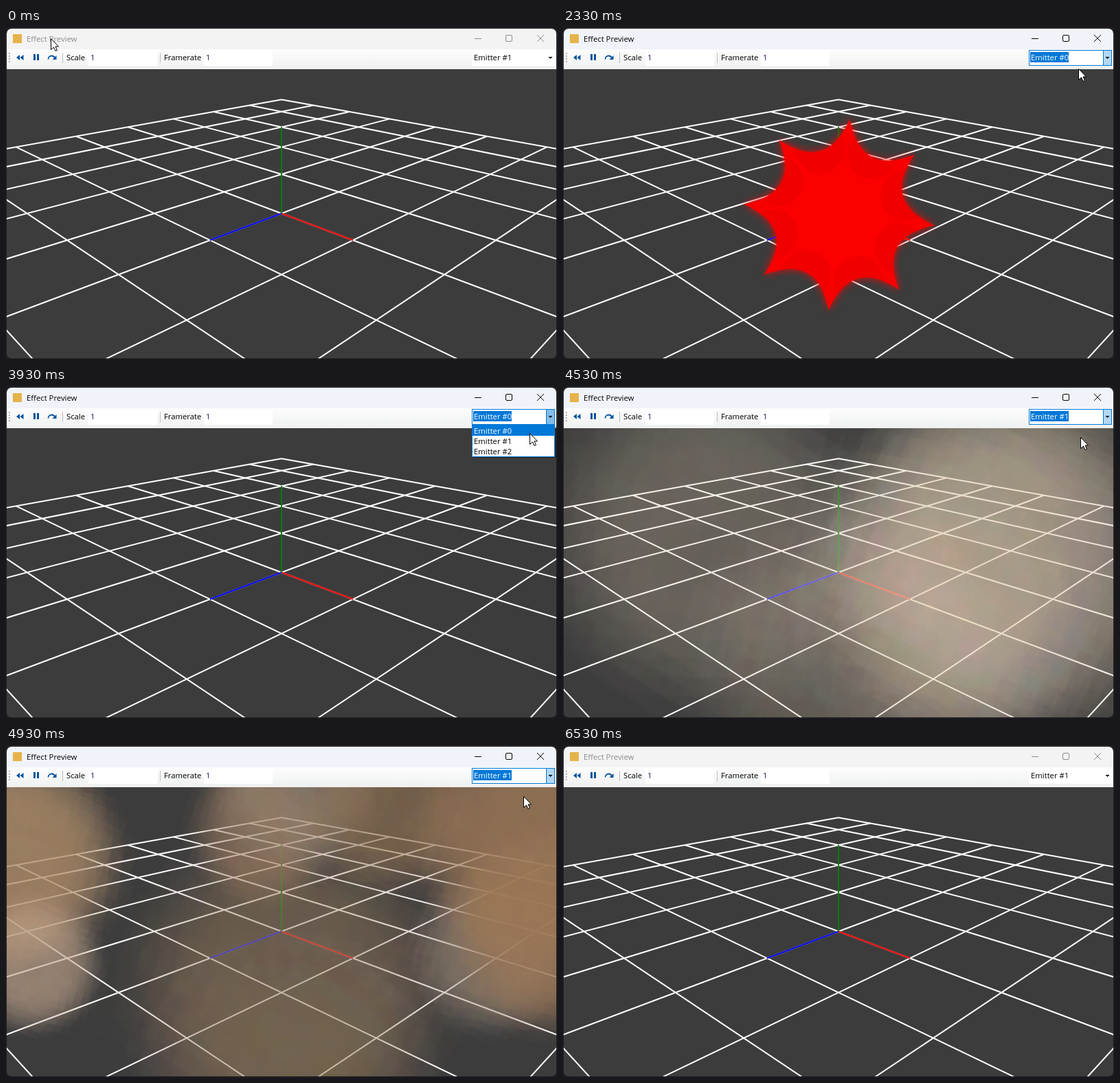
An HTML page with a canvas for the animation above (6.59 s loop, 802 px wide and 482 px high).

```html
<!DOCTYPE html>
<html lang="en">
<head>
<meta charset="utf-8">
<title>Effect Preview</title>
<style>
html, body { margin: 0; width: 100%; height: 100%; overflow: hidden; background: #1e1e1e; }
canvas { display: block; }
</style>
</head>
<body>
<canvas id="stage" width="802" height="482"></canvas>
<script>
const ctx = document.getElementById('stage').getContext('2d');
const LOOP = 6590, STEP = 1000 / 15;
const BLUE = '#0078d7';

function rect(x, y, w, h, color) {
  ctx.fillStyle = color;
  ctx.fillRect(x, y, w, h);
}

function text(str, x, y, color = '#000') {
  ctx.font = '11.3px "Open Sans", "Noto Sans", sans-serif';
  ctx.fillStyle = color;
  ctx.fillText(str, x, y);
}

function poly(points, fill, stroke, width = 1) {
  ctx.beginPath();
  points.forEach(([x, y]) => ctx.lineTo(x, y));
  if (fill) {
    ctx.closePath();
    ctx.fillStyle = fill;
    ctx.fill();
  }
  if (stroke) {
    ctx.strokeStyle = stroke;
    ctx.lineWidth = width;
    ctx.stroke();
  }
}

function seeded(seed) {
  return () => (seed = seed * 16807 % 2147483647) / 2147483647;
}

// Floor plane seen in perspective along its diagonal
function project(x, z) {
  const s = (x + z) / 2, w = 1 - 0.2192 * s;
  return [401 + 92.6 * (x - z) / w, (270 + 10.3 * s) / w];
}

function drawGrid() {
  for (let i = -5; i <= 5; i++) {
    const end = Math.min(5, 8.8 - i);
    poly([project(-5, i), project(end, i)], null, '#fff', 2);
    poly([project(i, -5), project(i, end)], null, '#fff', 2);
  }
  const origin = project(0, 0);
  poly([origin, project(1, 0)], null, '#f00000', 2);
  poly([origin, project(0, 1)], null, '#0000f0', 2);
  poly([origin, [401, 144]], null, '#008000', 2);
}

function drawStar(radius, alpha) {
  const at = (turn, r) => [Math.cos(turn * Math.PI / 4 - 1.46) * r, Math.sin(turn * Math.PI / 4 - 1.46) * r];
  ctx.save();
  ctx.translate(402, 272);
  ctx.globalAlpha = alpha;
  ctx.beginPath();
  ctx.moveTo(...at(0, radius));
  for (let i = 0; i < 8; i++) ctx.quadraticCurveTo(...at(i + 0.5, radius * 0.456), ...at(i + 1, radius));
  ctx.fillStyle = '#fa0000';
  ctx.shadowColor = '#f00';
  ctx.shadowBlur = 12;
  ctx.fill();
  ctx.shadowBlur = 0;
  ctx.clip();
  for (let i = 0; i < 8; i++) {
    ctx.beginPath();
    ctx.arc(...at(i + 0.5, radius * 0.72), radius * 0.26, 0, 7);
    ctx.fillStyle = 'rgba(225,0,0,.4)';
    ctx.fill();
  }
  ctx.restore();
}

// Coarse soft sprite, enlarged without smoothing
function makeSprite(rgb) {
  const size = 18, rand = seeded(77), sprite = document.createElement('canvas');
  sprite.width = sprite.height = size;
  const pen = sprite.getContext('2d');
  for (let y = 0; y < size; y++) for (let x = 0; x < size; x++) {
    const r = Math.hypot(x - 8.5, y - 8.5) / 9;
    const edge = Math.max(0, Math.min(1, (1 - r) / 0.45));
    pen.fillStyle = `rgba(${rgb},${edge * (0.88 + 0.12 * rand())})`;
    pen.fillRect(x, y, 1, 1);
  }
  return sprite;
}

const puff = (x, y, size, alpha, rgb) => ({ x, y, size, alpha, sprite: makeSprite(rgb) });
const PALE = '226,204,175', BROWN = '155,118,85';
const haze = [
  puff(630, 240, 560, 0.52, PALE),
  puff(600, 220, 420, 0.2, PALE),
  puff(210, 220, 500, 0.26, PALE),
  puff(440, 430, 520, 0.22, PALE),
  puff(560, 330, 420, 0.15, PALE)
];
const clouds = [
  puff(400, 340, 480, 0.5, '150,120,90'),
  puff(410, 480, 420, 0.15, '150,120,90'),
  puff(420, 60, 260, 0.55, '160,150,135'),
  puff(370, 130, 210, 0.55, '165,128,98'),
  puff(560, 90, 260, 0.65, '145,112,80'),
  puff(30, 160, 320, 0.82, '175,140,105'),
  puff(60, 310, 200, 0.65, '195,165,140'),
  puff(690, 300, 240, 0.55, '165,145,125'),
  puff(760, 150, 370, 0.85, BROWN),
  puff(770, 270, 300, 0.8, BROWN)
];

function drawPuffs(puffs, spread, fade) {
  const copies = 7, rand = seeded(4242);
  ctx.imageSmoothingEnabled = false;
  for (const p of puffs) {
    const alpha = 1 - (1 - p.alpha * fade) ** (1 / copies);
    for (let i = 0; i < copies; i++) {
      ctx.save();
      ctx.globalAlpha = alpha;
      ctx.translate(
        400 + (p.x - 400) * spread + (rand() - 0.5) * p.size * 0.12,
        230 + (p.y - 230) * spread + (rand() - 0.5) * p.size * 0.12
      );
      ctx.rotate((rand() - 0.5) * 0.8 + spread * 0.3);
      ctx.drawImage(p.sprite, -p.size / 2, -p.size / 2, p.size, p.size);
      ctx.restore();
    }
  }
}

const clamp = v => Math.max(0, Math.min(1, v));

function drawScene(f) {
  ctx.save();
  ctx.beginPath();
  ctx.rect(1, 60, 800, 421);
  ctx.clip();
  rect(1, 60, 800, 421, '#3c3c3c');
  drawGrid();
  if (f === 35) drawStar(140, 0.96);
  if (f === 36) drawStar(298, 0.5);
  if (f > 66 && f < 74) drawPuffs(haze, 1 + (f - 68) * 0.06, Math.min(clamp((f - 66) / 2), clamp((74 - f) / 6)));
  if (f > 68 && f < 87) drawPuffs(clouds, 1 + (f - 73) * 0.06, Math.min(clamp((f - 68) / 5), clamp((87 - f) / 13)));
  ctx.restore();
}

function drawTitle(active) {
  rect(1, 1, 800, 30, active ? '#f0f3f9' : '#f3f3f3');
  const ink = active ? '#000' : '#8c8c8c';
  rect(10, 9, 13, 13, '#e5b34a');
  text('Effect Preview', 30, 20, ink);
  poly([[682, 15.5], [692, 15.5]], null, ink);
  ctx.beginPath();
  ctx.roundRect(727.5, 10.5, 9, 9, 1.5);
  ctx.stroke();
  poly([[773, 10], [783, 20]], null, ink);
  poly([[783, 10], [773, 20]], null, ink);
}

function drawToolbar() {
  const shade = ctx.createLinearGradient(0, 31, 0, 60);
  shade.addColorStop(0, '#fdfdfd');
  shade.addColorStop(1, '#eff0f0');
  rect(1, 31, 800, 29, shade);
  for (let y = 36; y < 51; y += 4) rect(4, y, 2, 2, '#b0b0b0');
  const ink = '#00539c';
  for (const x of [15, 20.5]) poly([[x, 43], [x + 5, 39], [x + 5, 47]], ink);
  rect(40, 38, 3, 9, ink);
  rect(45, 38, 3, 9, ink);
  ctx.beginPath();
  ctx.arc(66.5, 45.5, 5, Math.PI, -0.4);
  ctx.strokeStyle = ink;
  ctx.lineWidth = 1.8;
  ctx.stroke();
  poly([[73.5, 40], [73.5, 46], [67.5, 46]], ink);
  for (const x of [82, 224]) rect(x, 36, 1, 15, '#bdbdbd');
  for (const [label, x, field] of [['Scale', 88, 120], ['Framerate', 230, 288]]) {
    text(label, x, 47);
    rect(field, 32, 100, 23, '#fff');
    text('1', field + 3, 47, '#30104a');
  }
}

function drawCombo(f, active, open) {
  const hot = active || (f >= 10 && f < 18);
  const value = 'Emitter #' + (f >= 34 && f < 66 ? 0 : 1);
  rect(678, 32, 121, 23, '#fff');
  if (hot) {
    rect(786, 33, 12, 21, open ? '#83bdea' : '#b3d7f3');
    ctx.strokeStyle = BLUE;
    ctx.lineWidth = 1;
    ctx.strokeRect(678.5, 32.5, 120, 22);
    poly([[786.5, 33], [786.5, 54]], null, BLUE);
  }
  poly([[789.5, 42], [795.5, 42], [792.5, 45]], '#000');
  if (active) rect(680, 35, 56, 15, BLUE);
  text(value, 681, 47, active ? '#fff' : '#000');
  if ((f >= 23 && f < 31) || (f >= 86 && f < 90)) rect(735, 36, 1, 14, '#000');
}

function drawList(f) {
  const selected = f < 34 ? (f < 24 ? 1 : 0) : (f < 62 ? 0 : 1);
  rect(681, 58, 120, 45, 'rgba(0,0,0,.35)');
  rect(678, 55, 121, 47, BLUE);
  rect(679, 56, 119, 45, '#fff');
  for (let i = 0; i < 3; i++) {
    if (i === selected) rect(679, 56 + i * 15, 119, 15, BLUE);
    text('Emitter #' + i, 681, 68 + i * 15, i === selected ? '#fff' : '#000');
  }
}

// Pointer stops: step, x, y
const path = [
  [0, 65, 15], [5, 799, 14], [13, 792, 44], [22, 792, 44], [26, 750, 59], [42, 750, 59],
  [51, 792, 44], [54, 792, 44], [59, 762, 67], [63, 753, 73], [97, 753, 73]
];

function drawPointer(f) {
  if ((f > 0 && f < 5) || f >= 97) return;
  const next = path.findIndex(stop => stop[0] > f);
  const [f0, x0, y0] = path[next - 1], [f1, x1, y1] = path[next];
  const k = (f - f0) / (f1 - f0);
  ctx.save();
  ctx.translate(Math.round(x0 + (x1 - x0) * k) + 0.5, Math.round(y0 + (y1 - y0) * k) + 0.5);
  poly([[0, 0], [0, 16], [4, 12.5], [6.5, 18], [9, 17], [6.5, 11.5], [11, 11.5], [0, 0]], '#fff', '#000');
  ctx.restore();
}

function draw(f) {
  const active = f >= 18 && f < 97;
  const open = (f >= 19 && f < 34) || (f >= 53 && f < 66);
  rect(0, 0, 802, 482, '#1e1e1e');
  ctx.save();
  ctx.beginPath();
  ctx.roundRect(1, 1, 800, 480, 7);
  ctx.clip();
  drawScene(f);
  drawTitle(active);
  drawToolbar();
  drawCombo(f, active, open);
  if (open) drawList(f);
  ctx.restore();
  drawPointer(f);
}

const start = performance.now();
let shown = -1;
function tick() {
  const time = (performance.now() - start) % LOOP;
  const step = Math.min(98, Math.floor((time + 4) / STEP));
  if (step !== shown) draw(shown = step);
  requestAnimationFrame(tick);
}
tick();
</script>
</body>
</html>
```
